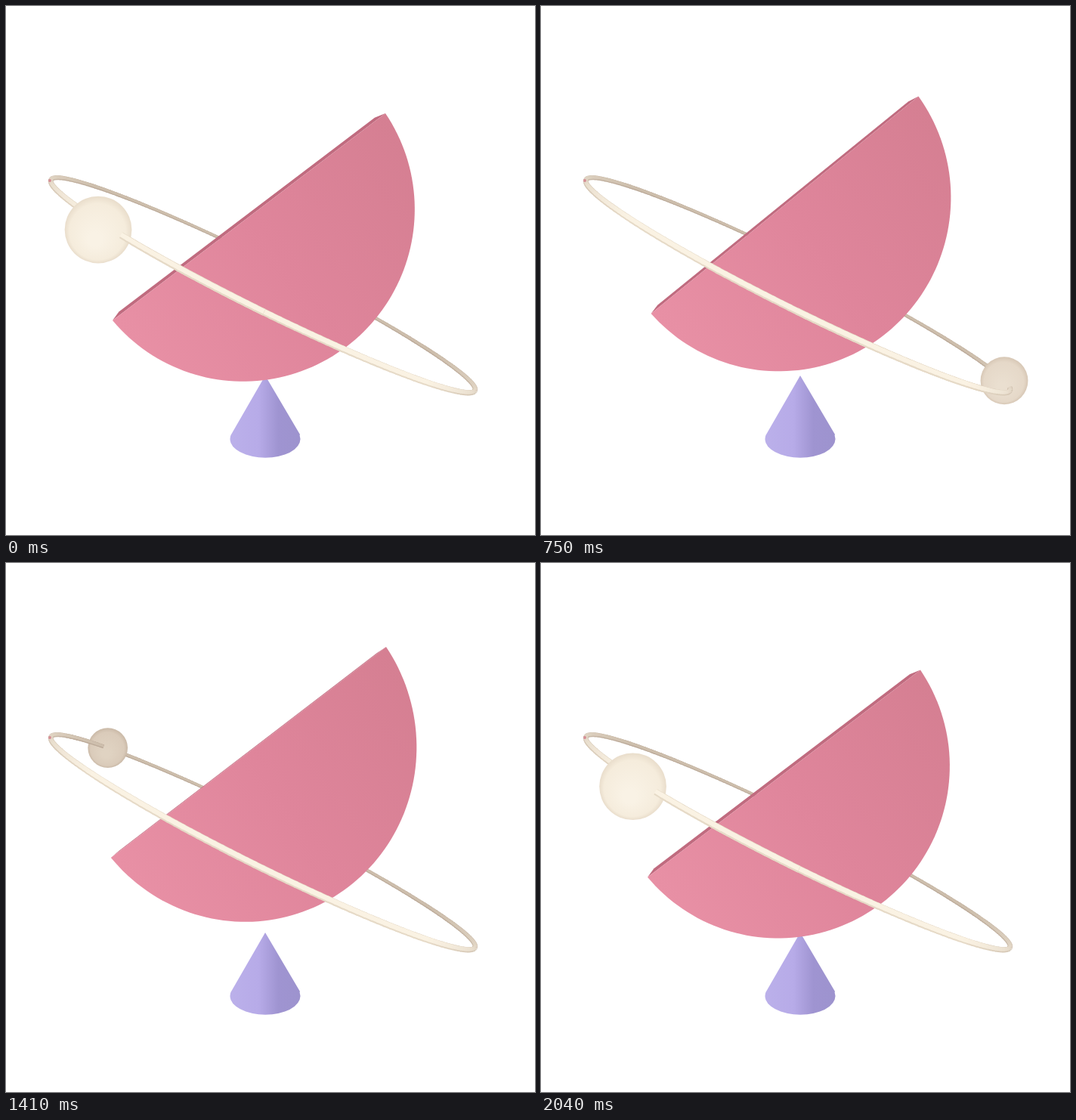
Write an HTML page with a canvas that moves like this. It is 700x700 px and loops after 2070 ms.

```html
<!DOCTYPE html>
<html lang="en">
<head>
<meta charset="utf-8">
<title>Balancing half disc</title>
<style>
  html, body { margin: 0; width: 100%; height: 100%; overflow: hidden; background: #fff; }
  canvas { display: block; }
</style>
</head>
<body>
<canvas id="stage" width="700" height="700"></canvas>
<script>
const ctx = document.getElementById('stage').getContext('2d');
const LOOP = 2070, STEP = 30, RAD = Math.PI / 180;
const DEPTH = 0.376;  // perspective strength of the orbit
const HOLE = 5;       // degrees of ring hidden inside the ball, on its near side

const lerp = (a, b, p) => a + (b - a) * p;
const clamp = p => Math.min(1, Math.max(0, p));
const smooth = p => p * p * (3 - 2 * p);
const mix = (a, b, p) => `rgb(${a.map((n, i) => Math.round(lerp(n, b[i], p)))})`;

// Point of a unit circle seen in perspective; angle 0 is nearest to the viewer.
function orbit(deg) {
  const c = Math.cos(deg * RAD), w = 1 - DEPTH * c;
  return {
    u: Math.sqrt(1 - DEPTH * DEPTH) * Math.sin(deg * RAD) / w,
    v: (c - DEPTH) / w
  };
}

function ringPoint(deg) {
  const { u, v } = orbit(deg);
  return { x: 340 + 281 * u, y: 369.5 + 138 * u + 35 * v, v, width: 6.6 + 2.6 * v };
}

function ringPass(from, to, dark, light, scale, lift) {
  const n = Math.max(1, Math.ceil(Math.abs(to - from) / 1.5));
  for (let i = 0; i < n; i++) {
    // neighbouring pieces overlap a little to hide the joints
    const a = ringPoint(lerp(from, to, (i - 0.15) / n));
    const b = ringPoint(lerp(from, to, (i + 1.15) / n));
    const shift = lift * b.width;
    ctx.strokeStyle = mix(dark, light, clamp(0.5 + 0.8 * b.v));
    ctx.lineWidth = b.width * scale;
    ctx.beginPath();
    ctx.moveTo(a.x, a.y - shift);
    ctx.lineTo(b.x, b.y - shift);
    ctx.stroke();
  }
}

function drawRing(from, to) {
  ringPass(from, to, [184, 166, 149], [230, 218, 199], 1, 0);
  ringPass(from, to, [205, 190, 172], [250, 242, 227], 0.7, 0.1);
}

function drawBall(deg) {
  const { u, v } = orbit(deg);
  const x = 334 + 283 * u, y = 369.5 + 135.1 * u + 41.9 * v;
  const r = 34.8 - 1.2 * u + 13.1 * v;
  const lit = clamp(0.62 + 0.6 * v);
  const g = ctx.createRadialGradient(x - r * 0.1, y + r * 0.3, r * 0.2, x, y, r);
  g.addColorStop(0, mix([218, 203, 186], [249, 242, 229], lit));
  g.addColorStop(0.8, mix([211, 195, 178], [245, 236, 220], lit));
  g.addColorStop(1, mix([195, 176, 158], [233, 221, 203], lit));
  ctx.fillStyle = g;
  ctx.beginPath();
  ctx.arc(x, y, r, 0, 7);
  ctx.fill();
}

// The ball is pierced by the ring, which comes out again on its near side.
function drawPiercedBall(deg, limit) {
  drawBall(deg);
  const side = Math.sign(deg);
  const exit = Math.abs(deg) - HOLE;
  if (exit > limit) drawRing(exit * side, limit * side);
}

function drawCone() {
  const g = ctx.createLinearGradient(297, 0, 390, 0);
  g.addColorStop(0, '#bbb0ea');
  g.addColorStop(0.4, '#b7abe8');
  g.addColorStop(0.68, '#9f94d1');
  g.addColorStop(1, '#9d93ce');
  ctx.fillStyle = g;
  ctx.beginPath();
  ctx.moveTo(343, 489);
  ctx.lineTo(389, 567);
  ctx.ellipse(343, 573, 46.5, 24.7, 0, -0.2, Math.PI + 0.2);
  ctx.closePath();
  ctx.fill();
}

// Poses: right tip, left tip, bulge vector, thickness of the top edge
const REST = [502, 142, 141, 416, 126.6, 168.3, 0.019];
const HIGH = [496.8, 96.5, 150.3, 397.5, 138, 163.6, 0.011];
const FLAT = [503.2, 103, 138.3, 383.3, 130.5, 176.2, 0];
const KEYS = [[0, REST], [490, HIGH], [1005, REST], [1575, FLAT], [LOOP, REST]];

function discPose(t) {
  const i = KEYS.findIndex(k => t < k[0]);
  const [t0, a] = KEYS[i - 1], [t1, b] = KEYS[i];
  const p = smooth((t - t0) / (t1 - t0));
  return a.map((n, j) => lerp(n, b[j], p));
}

function drawDisc(t) {
  const [rx, ry, lx, ly, dx, dy, edge] = discPose(t);
  ctx.save();
  ctx.transform((rx - lx) / 2, (ry - ly) / 2, dx, dy, (rx + lx) / 2, (ry + ly) / 2);
  ctx.fillStyle = '#c06b7f';
  ctx.beginPath();
  ctx.moveTo(-1, 0);
  ctx.lineTo(-0.94, -edge);
  ctx.lineTo(0.935, -edge);
  ctx.lineTo(1, 0);
  ctx.fill();
  const g = ctx.createLinearGradient(-1, 0.2, 1, 0.3);
  g.addColorStop(0, '#e890a5');
  g.addColorStop(0.5, '#df859b');
  g.addColorStop(1, '#d57f92');
  ctx.fillStyle = g;
  ctx.beginPath();
  // half circle leaning slightly away from the viewer
  for (let deg = 0; deg <= 180; deg += 2) {
    const s = Math.sin(deg * RAD), w = 1 + 0.05 * s;
    ctx.lineTo(Math.cos(deg * RAD) / w, 1.071 * s / w);
  }
  ctx.fill();
  ctx.restore();
}

function draw(t) {
  const turn = smooth(((t + 14) % LOOP) / LOOP);
  let ball = -33.8 + 360 * turn;
  if (ball > 180) ball -= 360;
  const behind = Math.abs(ball) > 90;
  const reach = behind ? Math.min(90, Math.abs(ball) - HOLE) : 90;

  ctx.fillStyle = '#fff';
  ctx.fillRect(0, 0, 700, 700);
  drawCone();
  drawRing(90, 270);
  if (behind) drawPiercedBall(ball, 90);
  drawDisc(t);
  drawRing(ball < 0 ? -reach : -90, ball > 0 ? reach : 90);
  if (!behind) {
    drawPiercedBall(ball, 0);
  }
  if (Math.abs(ball + 75) > 30) {
    ctx.fillStyle = '#d58f95';
    ctx.beginPath();
    ctx.arc(58, 231, 2, 0, 7);
    ctx.fill();
  }
}

const start = performance.now();
function tick() {
  const t = (performance.now() - start) % LOOP;
  draw(Math.floor(t / STEP) * STEP);
  requestAnimationFrame(tick);
}
tick();
</script>
</body>
</html>
```
